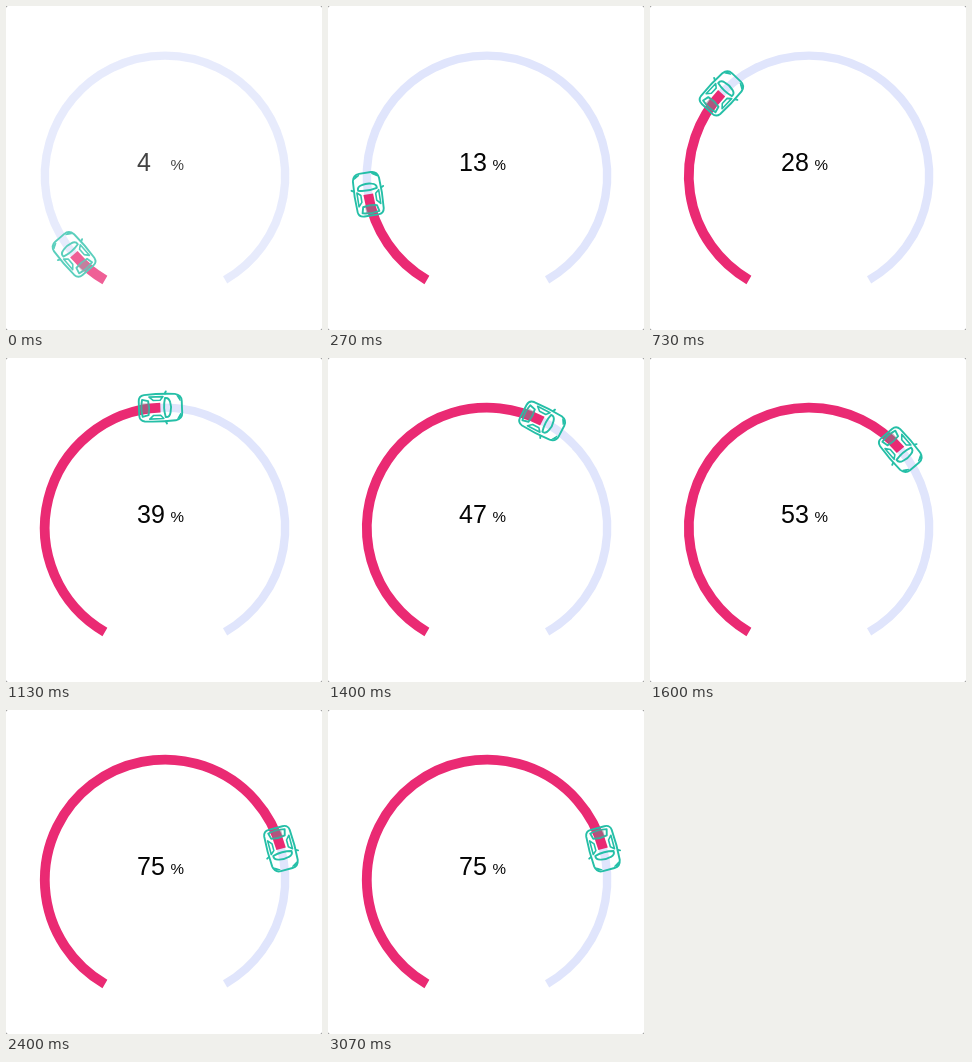
Animation of 316x324 px, one loop 3.14 s. Source, as an HTML page:

```html
<!DOCTYPE html>
<html lang="en">
<head>
<meta charset="utf-8">
<title>Car progress gauge</title>
<style>
  html, body { margin: 0; width: 100%; height: 100%; overflow: hidden; background: #fff; }
  svg { display: block; width: 316px; height: 324px; }
  text { font-family: "Liberation Sans", Arial, sans-serif; fill: #050505; }
  .arc { fill: none; }
  #car { fill: none; stroke: #25bfa7; stroke-width: 1.9; stroke-linejoin: round; stroke-linecap: round; }
</style>
</head>
<body>
<svg viewBox="0 0 316 324">
  <rect width="316" height="324" fill="#777"/>
  <rect width="316" height="324" rx="2" fill="#fff"/>
  <g id="gauge">
    <path id="track" class="arc" stroke="#e0e5fc" stroke-width="8.4"/>
    <path id="progress" class="arc" stroke="#ea2a73" stroke-width="9.8"/>
    <g id="car">
      <path d="M-16 -13.2 Q0 -14.4 15 -13.2 Q21.6 -12 21.6 -6 V6 Q21.6 12 15 13.2 Q0 14.4 -16 13.2 Q-21.4 12.5 -21.4 7 V-7 Q-21.4 -12.5 -16 -13.2Z"/>
      <path d="M5 -9.5 Q9 -10 10 -5 Q11.5 0 10 5 Q9 10 5 9.5 Q2.5 0 5 -9.5Z"/>
      <path d="M-18 -8.5 L-12 -7 Q-10.5 0 -12 7 L-18 8.5 Q-20 0 -18 -8.5Z"/>
      <path d="M-19 0 H-11" stroke="#777f8a" stroke-opacity=".5" stroke-width="9.8" stroke-linecap="butt"/>
      <g id="side">
        <path d="M-11 -11 H3 L0 -7.5 H-7Z" stroke-width="1.6"/>
        <path d="M5 -14 L6 -16"/>
        <path d="M17 -11.5 L19.5 -10 L20 -6.5Z" fill="#25bfa7" stroke-width="1"/>
      </g>
      <use href="#side" transform="scale(1 -1)"/>
    </g>
    <text id="count" x="131.1" y="165" font-size="25"></text>
    <text x="164.6" y="164" font-size="15.2">%</text>
  </g>
</svg>
<script>
const LOOP = 3140, STEP = 1000 / 15;
const CENTER = { x: 159, y: 169.8 }, RADIUS = 120.2, START = 120;
const el = id => document.getElementById(id);

function pointAt(angle) {
  const a = angle * Math.PI / 180;
  return [CENTER.x + RADIUS * Math.cos(a), CENTER.y + RADIUS * Math.sin(a)];
}

function arc(sweep) {
  return `M${pointAt(START)} A${RADIUS} ${RADIUS} 0 ${sweep > 180 ? 1 : 0} 1 ${pointAt(START + sweep)}`;
}

function render(ms) {
  // The picture advances in steps of a fifteenth of a second.
  const t = Math.floor((ms + 4) / STEP) * STEP;
  const sweep = Math.min(225, 22 + 0.111 * t - 2.7 * Math.exp(-t / 150));
  const count = 4.5 + 0.0325 * Math.min(t, 730) + 0.029 * Math.max(0, t - 730);
  el("progress").setAttribute("d", arc(sweep));
  el("car").setAttribute("transform", `translate(${pointAt(START + sweep)}) rotate(${START + sweep + 90})`);
  el("count").textContent = Math.min(75, Math.floor(count));
  el("gauge").setAttribute("opacity", Math.min(1, 0.75 + t / 500));
}

el("track").setAttribute("d", arc(300));
const begin = performance.now();
function tick() {
  render((performance.now() - begin) % LOOP);
  requestAnimationFrame(tick);
}
tick();
</script>
</body>
</html>
```
